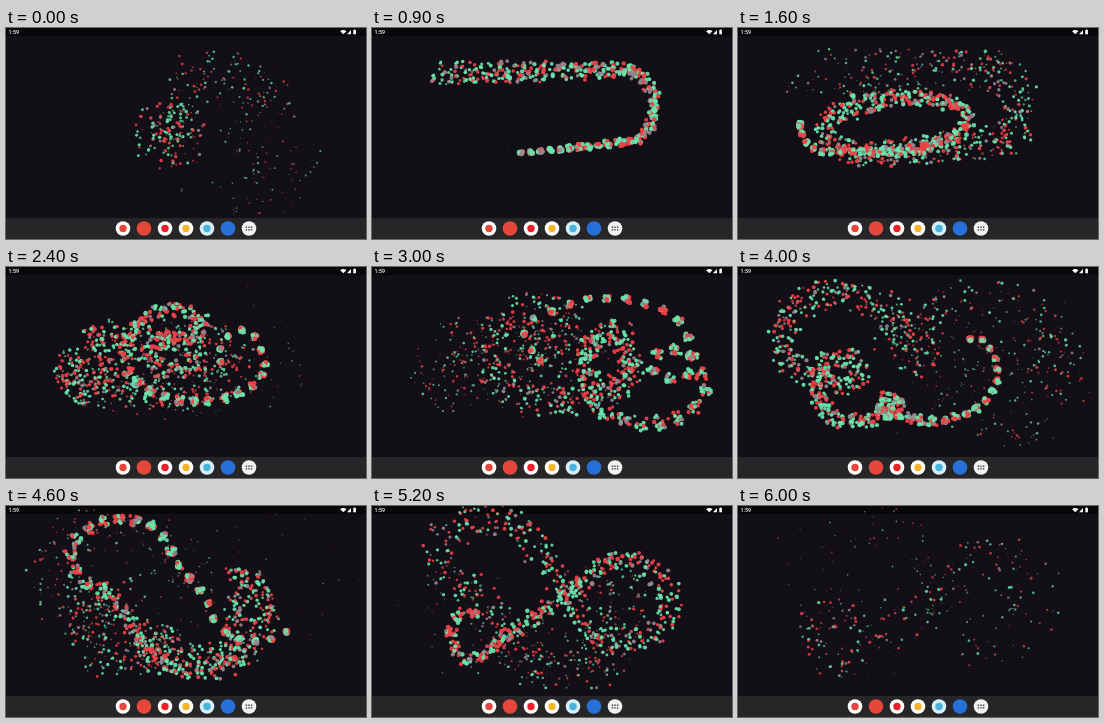
An HTML page with a canvas that plays this animation: 360x211 px, repeating every 6.1 s.

```html
<!DOCTYPE html>
<html lang="en">
<head>
<meta charset="utf-8">
<title>Particle trail</title>
<style>
  html, body { margin: 0; width: 100%; height: 100%; overflow: hidden; background: #121016; }
  canvas { display: block; width: 360px; height: 211px; }
</style>
</head>
<body>
<canvas id="stage"></canvas>
<script>
const W = 360, H = 211, LOOP = 6100, STEP = 100;
const canvas = document.getElementById('stage');
const ctx = canvas.getContext('2d');
const scale = window.devicePixelRatio || 1;
canvas.width = W * scale;
canvas.height = H * scale;
ctx.scale(scale, scale);

let seed = 20459;
function random() {
  seed = (seed + 0x6D2B79F5) | 0;
  let n = Math.imul(seed ^ (seed >>> 15), 1 | seed);
  n ^= n + Math.imul(n ^ (n >>> 7), 61 | n);
  return ((n ^ (n >>> 14)) >>> 0) / 4294967296;
}
const spread = size => (random() * 2 - 1) * size;

// Points along an ellipse; angles are in turns, clockwise from the right.
function arc(cx, cy, rx, ry, from, to, tilt = 0) {
  const steps = 32, cos = Math.cos(tilt), sin = Math.sin(tilt);
  return Array.from({ length: steps + 1 }, (_, i) => {
    const angle = 2 * Math.PI * (from + (to - from) * i / steps);
    const x = rx * Math.cos(angle), y = ry * Math.sin(angle);
    return [cx + x * cos - y * sin, cy + x * sin + y * cos];
  });
}

const particles = [];
const TICK = 16, PER_TICK = 14;

function pickColor() {
  const r = random();
  return r < 0.46 ? '#69e5ad' : r < 0.86 ? '#ee4248' : '#96868f';
}

function emit(born, [x, y]) {
  for (let i = 0; i < PER_TICK; i++) {
    particles.push({
      born, x: x + spread(1.8), y: y + spread(1.8),
      vx: spread(0.018), vy: spread(0.018),
      life: 900 + 1100 * random(),
      radius: 2 + random() * 0.7,
      color: pickColor()
    });
  }
}

// Moves the emitter at constant speed along arcs joined by straight lines.
function stroke(start, end, ...arcs) {
  const points = arcs.flat();
  const reach = [0];
  for (let i = 1; i < points.length; i++) {
    const [a, b] = [points[i - 1], points[i]];
    reach.push(reach[i - 1] + Math.hypot(b[0] - a[0], b[1] - a[1]));
  }
  let i = 1;
  for (let time = start; time < end; time += TICK) {
    const distance = reach[reach.length - 1] * (time - start) / (end - start);
    while (reach[i] < distance) i++;
    const u = (distance - reach[i - 1]) / (reach[i] - reach[i - 1] || 1);
    emit(time, points[i].map((v, k) => points[i - 1][k] + u * (v - points[i - 1][k])));
  }
}

stroke(-1700, -950,
  arc(225, 145, 65, 20, 0.3, 0),
  arc(268, 98, 28, 30, 0.25, 0.75),
  arc(212, 68, 38, 24, -0.1, -0.5),
  arc(164, 108, 16, 17, -0.25, 1));
stroke(250, 1600,
  [[70, 45]],
  arc(253, 78, 30, 36, -0.25, 0.25),
  arc(158, 97, 72, 27, 0.25, 1.25, -0.1),
  arc(85, 92, 23, 32, 0.25, 0.5));
stroke(1600, 2400,
  arc(80, 98, 18, 30, 0.5, -0.25),
  arc(168, 88, 26, 16, -0.3, 0.6),
  arc(165, 85, 45, 42, -0.1, -0.5),
  arc(190, 95, 70, 39, -0.5, -1),
  arc(235, 97, 23, 34, 0, -0.5));
stroke(2400, 3000,
  arc(235, 95, 21, 28, -0.5, -1.5),
  arc(275, 115, 60, 42, -0.5, -1),
  arc(300, 97, 21, 15, 0, -1),
  arc(235, 80, 84, 49, 0, -0.3),
  arc(172, 68, 20, 20, -0.3, -0.72));
stroke(3000, 4000,
  arc(168, 76, 20, 17, 0.25, -0.25),
  arc(100, 70, 57, 43, -0.15, -0.7),
  arc(102, 105, 19, 14, 0.25, -0.5),
  arc(120, 125, 42, 30, -0.5, -0.9),
  arc(152, 138, 10, 9, 0, -0.75),
  arc(195, 105, 65, 49, 0.35, -0.13));
stroke(4000, 4950,
  [[232, 72]],
  arc(190, 145, 45, 20, -0.1, 0.5),
  arc(115, 50, 50, 37, 0.3, 1),
  arc(250, 95, 48, 40, 0.5, -0.3),
  arc(98, 130, 19, 24, 0.15, 0.83));

function disc(x, y, r, color) {
  ctx.fillStyle = color;
  ctx.beginPath();
  ctx.arc(x, y, r, 0, Math.PI * 2);
  ctx.fill();
}

function box(x, y, w, h, color) {
  ctx.fillStyle = color;
  ctx.fillRect(x, y, w, h);
}

function drawParticles(time) {
  for (const p of particles) {
    const age = time - p.born;
    if (age < 0 || age >= p.life) continue;
    const left = 1 - age / p.life;
    ctx.globalAlpha = Math.min(0.92, 0.45 + left);
    disc(p.x + p.vx * age, p.y + p.vy * age, p.radius * Math.sqrt(left), p.color);
  }
  ctx.globalAlpha = 1;
}

function drawStatus() {
  ctx.fillStyle = '#fff';
  ctx.font = '500 5.3px Roboto, sans-serif';
  ctx.fillText('1:59', 2.6, 6);
  ctx.beginPath();
  ctx.moveTo(337.3, 6.2);
  ctx.arc(337.3, 6.2, 4.3, -Math.PI * 0.76, -Math.PI * 0.24);
  ctx.fill();
  ctx.beginPath();
  ctx.moveTo(341, 6.2);
  ctx.lineTo(345, 2);
  ctx.lineTo(345, 6.2);
  ctx.fill();
  box(347.3, 2, 2.6, 4.3, '#fff');
  box(348, 1.5, 1.2, 0.6, '#fff');
}

function drawDock() {
  box(0, 190, W, 21, '#262528');
  const icons = [
    ['#fff', '#e5483b'], ['#e5483b'], ['#fff', '#f01f25'],
    ['#fff', '#f5b52a'], ['#d9edf5', '#48b3df'], ['#2670d8'], ['#f2f2f2']
  ];
  icons.forEach(([plate, mark], i) => {
    const x = 117 + i * 21;
    disc(x, 200.5, 7.3, plate);
    if (mark) disc(x, 200.5, 3.7, mark);
  });
  for (let i = 0; i < 6; i++) {
    disc(240.4 + (i % 3) * 2.6, 199.2 + Math.floor(i / 3) * 2.6, 0.85, '#555');
  }
}

function draw(time) {
  box(0, 0, W, H, '#121016');
  box(0, 0, W, 8, '#08070a');
  drawParticles(time);
  drawStatus();
  drawDock();
}

const began = performance.now();
function frame() {
  const time = (performance.now() - began) % LOOP;
  draw(Math.floor(time / STEP) * STEP);
  requestAnimationFrame(frame);
}
frame();
</script>
</body>
</html>
```
